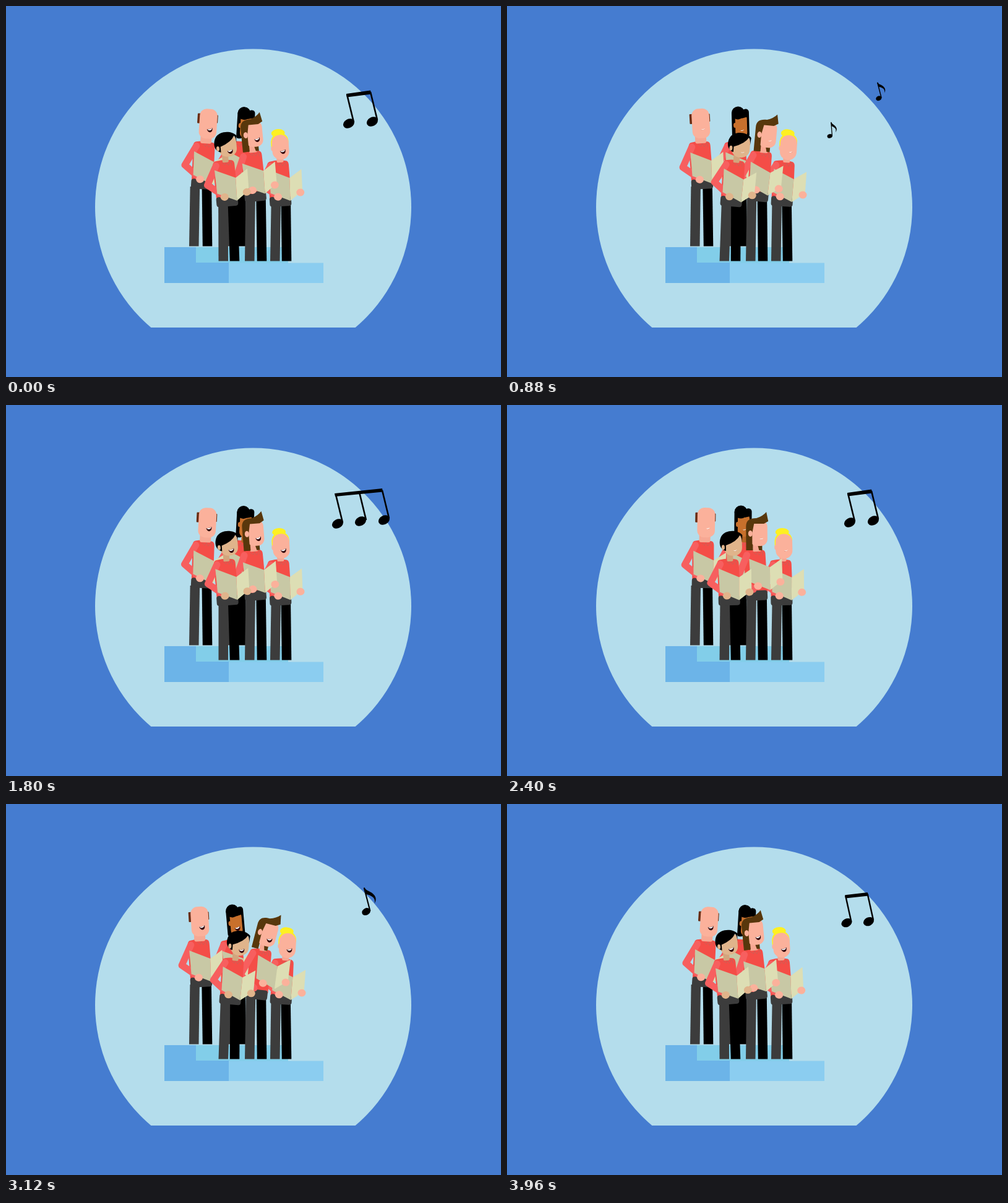
Write an HTML page that moves like this. It is 800 px wide and 600 px high and loops after 4 s.

```html
<!DOCTYPE html>
<html lang="en">
<head>
<meta charset="utf-8">
<title>Choir</title>
<style>
html, body { margin: 0; width: 100%; height: 100%; overflow: hidden; background: #457cd0; }
svg { display: block; width: 100vw; height: 100vh; }
</style>
</head>
<body>
<svg id="stage" viewBox="0 0 800 600">
  <rect width="800" height="600" fill="#457cd0"/>
  <path d="M234.4 520A255.5 255.5 0 1 1 564.6 520Z" fill="#b4ddec"/>
  <path d="M306 390H456V416H306Z" fill="#82cee9"/>
  <path d="M256 390H307V415H360V448H256Z" fill="#6cb4e8"/>
  <path d="M360 415.500H513V448H360Z" fill="#8bcdf0"/>
  <g id="choir"></g>
  <g id="notes"></g>
</svg>
<script>
const LOOP = 4000, SWAY = 2000, REACH = 600;
const TAU = Math.PI * 2;
const PALE = '#fbb19b', TAN = '#e0b48b', BROWN = '#c8702c';

const path = (d, fill) => `<path d="${d}" fill="${fill}"/>`;
const box = (x, y, w, h, r, fill) =>
  `<rect x="${x}" y="${y}" width="${w}" height="${h}" rx="${r}" fill="${fill}"/>`;
const oval = (x, y, rx, ry, fill, turn = 0) =>
  `<ellipse cx="${x}" cy="${y}" rx="${rx}" ry="${ry}" fill="${fill}" transform="rotate(${turn} ${x} ${y})"/>`;
const clamp = v => Math.max(0, Math.min(1, v));

// Back to front. x and hip: hip centre and trouser seat; sh: shoulder height;
// foot: shift of the left leg; lift: height of the book.
const singers = [
  {
    x: 371, hip: 296, feet: 388, sh: 220, pivot: 300, foot: 0, lift: 0, skin: BROWN, mouth: [383, 202],
    lean: (c, b, late) => 3.6 - b * (late ? 9 : 5.4),
    head: box(376, 205, 12, 17, 2, '#b56425') + box(366.500, 170, 10, 44, 4, '#000') +
      box(384, 167, 10.500, 46, 5, '#000') + box(372, 175, 19, 38, 8, BROWN) +
      oval(371.500, 193, 2.500, 4, BROWN) + oval(377, 173, 10.500, 10.500, '#000') +
      path('M376 168H392L391 180L383 182Z', '#000')
  },
  {
    x: 316, hip: 296, feet: 388, sh: 220, pivot: 298, foot: -1.5, lift: 0, skin: PALE, mouth: [323, 200],
    lean: c => 3.7 * c,
    head: box(309, 205, 18, 17, 3, '#f6a893') + box(302, 174, 8, 16, 1, '#6a2c12') +
      box(329, 175, 6, 13, 1, '#6a2c12') + box(305.500, 166, 28.500, 48, 11, PALE)
  },
  {
    x: 444, hip: 324, feet: 412, sh: 251, pivot: 322, foot: 1.5, lift: 0, skin: PALE, mouth: [453, 236],
    lean: c => -3.6 * c,
    head: box(442, 241, 11, 12, 2, '#f6a893') + oval(447, 205.500, 11, 6.500, '#fef022') +
      oval(449, 219, 14, 14, '#fef022') + box(434.500, 217, 5, 12, 2, '#fef022') +
      box(436, 208.500, 27, 40, 13, PALE) + oval(436.500, 230, 2.500, 4, PALE)
  },
  {
    x: 404, hip: 316, feet: 412, sh: 235, pivot: 318, foot: .5, lift: -3, skin: PALE, mouth: [416, 217],
    lean: (c, b, late) => late ? -5.6 + 12.1 * b ** 1.3 : -5.6 * c,
    tilt: (b, late) => late ? 9 * b ** 1.3 : 0,
    raise: (b, late) => late ? b ** .6 : 0,
    neck: box(401, 220, 13, 17, 2, '#f6a893'),
    head: path('M392 200H417V235H412L408 220H402V235H392Z', '#58370c') +
      box(397.500, 186, 28, 42, 11, PALE) +
      path('M391 235V197C391 186 397 183 408 183Q418 180 424 173L427 188L420 192H404L401 207V235Z', '#58370c') +
      oval(398, 208, 3.500, 5, PALE)
  },
  {
    x: 360, hip: 324, feet: 412, sh: 250, pivot: 345, foot: 2, lift: 0, skin: TAN, mouth: [372, 236],
    lean: c => -5 * c,
    head: box(358, 239, 10, 14, 2, '#d2a57d') + box(354, 207, 29, 37, 13, TAN) +
      path('M384 211C377 202 357 201 350 212C345 221 346 233 357 236V227Q375 221 380 211Q383 213 383 223Z', '#000') +
      oval(352.500, 230, 2.500, 4, TAN)
  }
];

function body(s) {
  const top = s.sh - s.hip;
  return `<g transform="translate(${s.x} ${s.hip})">` +
    path(`M-14 ${top}Q0 ${top - 3} 13 ${top}Q17 ${top + 1} 17 ${top + 7}L18 -12H-17L-18 ${top + 7}Q-18 ${top + 1} -14 ${top}Z`, '#f44d47') +
    box(-17.500, -16, 35, 16, 4, '#3c3c3c') +
    `<path d="M-3 ${top + 3}l5 4l2 -5l3 6l5 -7l1 8" fill="none" stroke="#c4625a" stroke-width=".8"/>` +
    `<path d="M-13 ${top + 7}L-29.500 -37L-5 -18" fill="none" stroke="#f75f5f" stroke-width="11" stroke-linejoin="round" stroke-linecap="round"/>` +
    `</g>`;
}

function book(s) {
  return `<g class="book"><g transform="translate(${s.x} ${s.hip + s.lift})">` +
    path('M-16 -60L17 -45L16 -8L-15 -22Z', '#c8c8a5') +
    path('M17 -45L37 -58L36.500 -23L16 -8Z', '#dddeb4') +
    oval(-3.500, -15.500, 6.500, 6, s.skin) + oval(33, -20.500, 6.500, 6, s.skin) + `</g></g>`;
}

const mouth = ([x, y]) => `<g transform="translate(${x} ${y}) rotate(-8)"><g class="lips">` +
  `<path class="jaw" d="M-4.500 -2Q0 -.5 4.500 -3C5 5 -3 6.500 -4.500 -2Z" fill="#32080c"/>` +
  path('M-4 -1.800Q0 -.6 4 -2.700Q3 .4 -.5 .5Q-3 .4 -4 -1.800Z', '#fff') + `</g></g>`;

document.getElementById('choir').innerHTML = singers.map(s =>
  `<g class="singer"><path class="leg" fill="#3c3c3c"/><path class="leg" fill="#000"/>` +
  `<g class="upper">${body(s)}${s.neck || ''}<g class="head">${s.head}${mouth(s.mouth)}</g>${book(s)}</g></g>`).join('');

document.querySelectorAll('.singer').forEach((el, i) => {
  const s = singers[i];
  s.legs = el.querySelectorAll('.leg');
  s.part = Object.fromEntries(['upper', 'head', 'book', 'lips', 'jaw']
    .map(name => [name, el.querySelector('.' + name)]));
});

// Notes at full size, drawn around their travelling point.
const noteHead = (x, y) => oval(x, y, 9.500, 7.200, '#000', -28);
const stem = (x, y) =>
  `<path d="M${x} ${y}l11 45" stroke="#000" stroke-width="2.600"/>`;
const shapes = {
  single: `<path d="M-9 -24L3 22" stroke="#000" stroke-width="2.600"/>` + oval(-5, 23.500, 9, 7, '#000', -28) +
    path('M-10 -25H-8C-5 -17 5 -19 12 -9Q17 -2 12 7Q14 -3 7 -7Q2 -11 -6 -12Z', '#000'),
  double: path('M-23 -26L16 -31.500L17.500 -25.500L-22 -20.500Z', '#000') +
    stem(-22, -25) + stem(16, -29) + noteHead(-19, 22) + noteHead(19, 19),
  triple: path('M-42 -25L35 -33L36 -27.500L-41 -20Z', '#000') +
    stem(-40, -23) + stem(-2, -27) + stem(35, -30) +
    noteHead(-37, 24) + noteHead(0, 20) + noteHead(38, 18)
};
// Each note is largest at its peak time.
const notes = [
  [0, 'double'], [600, 'single'], [1200, 'single'], [1800, 'triple'],
  [2400, 'double'], [3000, 'single'], [LOOP, 'double']
];
const noteLayer = document.getElementById('notes');
noteLayer.innerHTML = notes.map(n => `<g>${shapes[n[1]]}</g>`).join('');

function drawNote(el, dt) {
  const size = 1 - Math.abs(dt) / REACH;
  el.style.display = size > 0 ? '' : 'none';
  if (size <= 0) return;
  const rising = dt < 0;
  const x = 573 + dt * (rising ? .147 : .109);
  const y = 168 - (rising ? dt * .1 : 70 * (dt / REACH) ** 1.06);
  const turn = rising ? -dt * .032 : 0;
  el.setAttribute('transform', `translate(${x} ${y}) rotate(${turn}) scale(${size})`);
}

function drawSinger(s, t) {
  const c = Math.cos(TAU * t / SWAY), b = (1 - c) / 2, late = t >= SWAY;
  const a = s.lean(c, b, late);
  const pose = (name, value) => s.part[name].setAttribute('transform', value);
  pose('upper', `rotate(${a} ${s.x} ${s.pivot})`);
  if (s.tilt) pose('head', `rotate(${s.tilt(b, late)} 406 214)`);
  if (s.raise) {
    const up = s.raise(b, late);
    pose('book', `translate(${12 * up} ${-9 * up})`);
  }

  const dx = Math.sin(a * TAU / 360) * (s.pivot - s.hip);
  const leg = (i, top, foot) => s.legs[i].setAttribute('d',
    `M${s.x + top + dx} ${s.hip - 4}h15.500L${s.x + foot + 15.5} ${s.feet + .5}h-15.500Z`);
  leg(0, s.foot - 17, s.foot - 18.5);
  leg(1, .5, 1.8);

  const shut = clamp((Math.cos(TAU * (t - 307) * 6 / LOOP) - .2) / .43);
  pose('lips', `scale(${1 - shut * .25} ${1 - shut * .55})`);
  pose('jaw', `scale(1 ${1 - shut * .95})`);
}

function draw(now) {
  const t = now % LOOP;
  singers.forEach(s => drawSinger(s, t));
  notes.forEach(([peak], i) => drawNote(noteLayer.children[i], t - peak));
}

let start;
function tick(now) {
  start ??= now;
  draw(now - start);
  requestAnimationFrame(tick);
}
draw(0);
requestAnimationFrame(tick);
</script>
</body>
</html>
```
